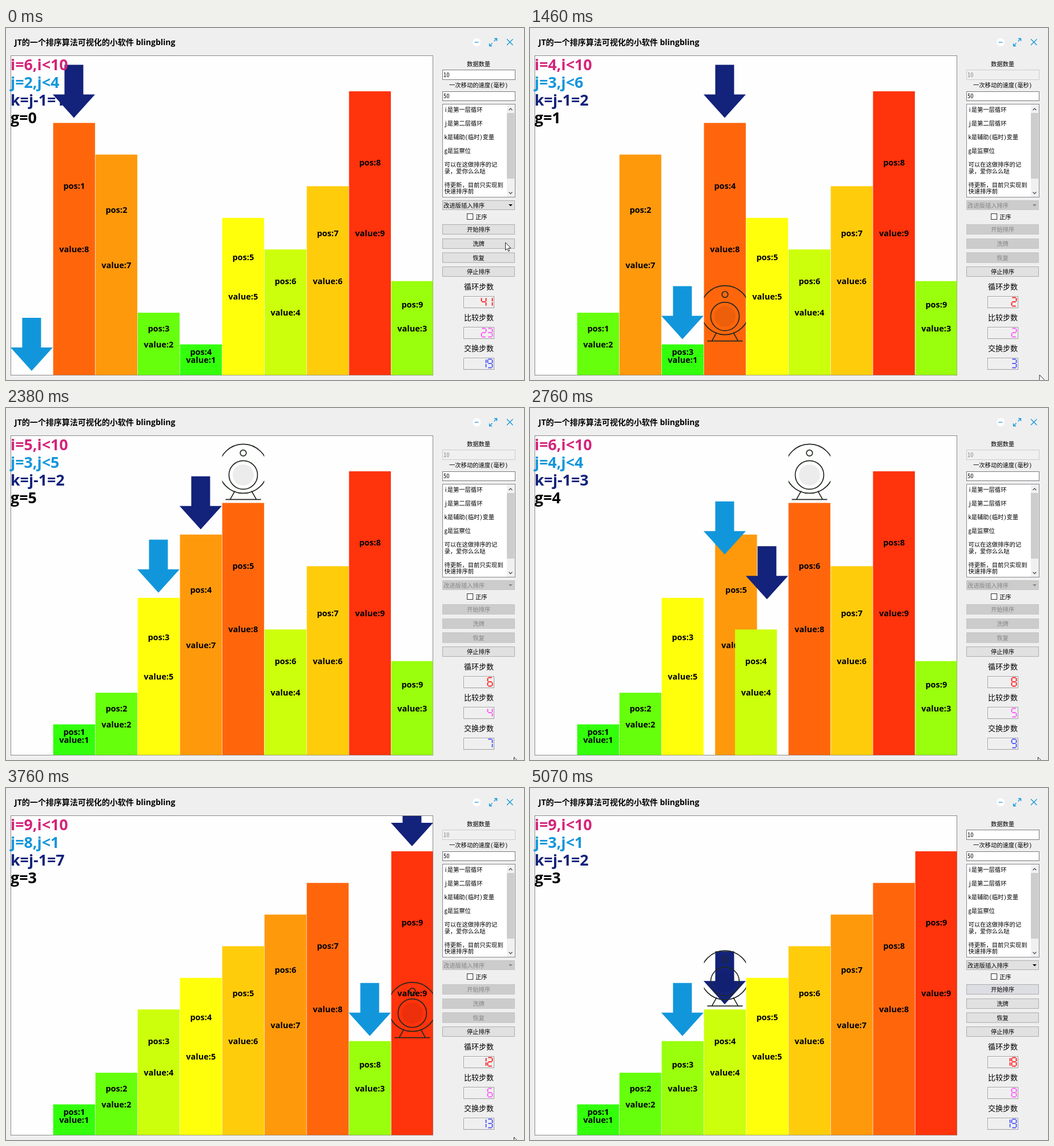
Write an HTML page with a canvas that moves like this. It is 907 px wide and 617 px high and loops after 5530 ms.

```html
<!DOCTYPE html>
<html lang="zh">
<head>
<meta charset="utf-8">
<title>排序可视化</title>
<style>
  html, body { margin: 0; width: 100%; height: 100%; overflow: hidden; background: #efefef; }
  canvas { display: block; }
</style>
</head>
<body>
<canvas id="stage" width="907" height="617"></canvas>
<script>
const ctx = document.getElementById('stage').getContext('2d');
const LOOP = 5530, TICK = 76.9;            // loop length and screen refresh, in ms
const START = 4, DONE = 64, RELEASE = 66;  // in ticks
const BLUE = '#1296db', NAVY = '#13227a', PINK = '#d4237a';
const LATIN = '"Open Sans", "Noto Sans CJK SC", sans-serif';
const SMALL = '10.3px "Noto Sans Mono CJK SC", "Noto Sans CJK SC", sans-serif';

const mix = (a, b, p) => a + (b - a) * p;
const mixPair = (a, b, p) => [mix(a[0], b[0], p), mix(a[1], b[1], p)];
const slotLeft = slot => 8.6 + 74 * slot;
const barTop = value => 610 - 55.45 * value;

// ---- sorting timeline: arrows fly in, bars swap, marker follows ----
const shuffled = [0, 8, 7, 2, 1, 5, 4, 6, 9, 3];

function buildTimeline() {
  const steps = [], order = [...shuffled];
  let clock = START, swaps = 0;
  const add = (duration, run) => {
    steps.push({ start: clock, duration, run });
    clock += duration;
  };
  add(2.63, s => { s.counters = [0, 0, 0]; });
  for (let i = 2; i < 10; i++) {
    const key = order[i];
    if (order[i - 1] < key) continue;
    add(0.837, (s, p) => {
      Object.assign(s, { i, j: i, g: key });
      s.marker = mixPair(s.marker || [i, key], [i, key], p);
    });
    for (let j = i; order[j - 1] > key; j--) {
      const big = order[j - 1];
      add(0.7, (s, p) => {
        s.j = j - 1;
        s.light = mixPair(s.light, [j - 1, big], p);
        s.dark = mixPair(s.dark, [j, key], p);
      });
      add(0.7, (s, p) => {
        s.slot[big] = mix(j - 1, j, p);
        s.slot[key] = mix(j, j - 1, p);
        s.label[big] = j;
        s.label[key] = j - 1;
        s.light = [j - 1, mix(big, key, p)];
        s.dark = [j, mix(key, big, p)];
      });
      clock += 0.75;
      const counters = [swaps, i - 1, ++swaps];
      add(0.55, (s, p) => {
        s.counters = counters;
        s.marker = mixPair(s.marker, [j, big], p);
      });
      [order[j - 1], order[j]] = [key, big];
    }
  }
  return steps;
}
const timeline = buildTimeline();

function stateAt(tick) {
  const slot = [];
  shuffled.forEach((value, index) => { slot[value] = index; });
  const state = {
    i: 6, j: 2, g: 0, slot, label: [...slot],
    light: [0, 0], dark: [1, 8], marker: null, counters: [41, 23, 19]
  };
  for (const { start, duration, run } of timeline)
    if (tick >= start) run(state, Math.min(1, (tick - start) / duration));
  return state;
}

// ---- drawing helpers ----
function text(str, x, y, font, color = '#000', align = 'center') {
  ctx.font = font;
  ctx.fillStyle = color;
  ctx.textAlign = align;
  ctx.fillText(str, x, y);
}
function box(x, y, w, h, fill, border) {
  ctx.fillStyle = fill;
  ctx.fillRect(x, y, w, h);
  ctx.strokeStyle = border;
  ctx.lineWidth = 1;
  ctx.strokeRect(x + 0.5, y + 0.5, w - 1, h - 1);
}
function fillShape(d, color) {
  ctx.fillStyle = color;
  ctx.fill(new Path2D(d));
}
function strokeShape(d, color, width) {
  ctx.strokeStyle = color;
  ctx.lineWidth = width;
  ctx.stroke(new Path2D(d));
}
function at(x, y, draw) {
  ctx.save();
  ctx.translate(x, y);
  draw();
  ctx.restore();
}
function circle(x, y, r) {
  ctx.beginPath();
  ctx.arc(x, y, r, 0, 7);
}

function drawBar(value, slot, label) {
  const top = barTop(value), height = 610 - top, x = slotLeft(slot);
  const red = Math.min(255, 51 * value), green = Math.min(255, 51 * (10 - value));
  ctx.fillStyle = `rgb(${red},${green},12)`;
  ctx.fillRect(x, top, 73.3, 608.5 - top);
  const font = 'bold 14.5px ' + LATIN;
  text('pos:' + label, x + 36.7, top + height / 4 + 5, font);
  text('value:' + value, x + 36.7, top + height / 2 + 5, font);
}

function drawArrow([slot, value], color) {
  at(slotLeft(slot) + 36.3, barTop(value) - 9, () =>
    fillShape('M-16.5 -93H16.5V-41H37L0 0L-37 -41H-16.5Z', color));
}

function drawMarker([slot, value]) {
  at(slotLeft(slot) + 36.8, barTop(value), () => {
    ctx.beginPath();
    ctx.rect(-36.8, -106, 73.6, 104);
    ctx.clip();
    ctx.strokeStyle = '#20281f';
    ctx.lineWidth = 1.7;
    for (const [y, r] of [[-60, 43], [-49, 25], [-87.5, 5.3]]) {
      circle(0, y, r);
      ctx.stroke();
    }
    circle(0, -49, 18.5);
    ctx.fillStyle = 'rgba(0,0,0,.07)';
    ctx.fill();
    strokeShape('M-31 -6H31M-14.5 -21L-23 -6M14.5 -21L23 -6', '#20281f', 1.7);
  });
}

function drawChart(s) {
  box(8, 48, 740, 561, '#fefefe', '#8a8a8a');
  ctx.save();
  ctx.beginPath();
  ctx.rect(8, 49, 739.5, 559.5);
  ctx.clip();
  for (let value = 1; value < 10; value++)
    if (value !== s.g) drawBar(value, s.slot[value], s.label[value]);
  if (s.g) drawBar(s.g, s.slot[s.g], s.label[s.g]);
  drawArrow(s.light, BLUE);
  drawArrow(s.dark, NAVY);
  if (s.marker) drawMarker(s.marker);
  ctx.restore();
  const lines = [
    [`i=${s.i},i<10`, PINK], [`j=${s.j},j<${10 - s.i}`, BLUE],
    [`k=j-1=${s.j - 1}`, NAVY], [`g=${s.g}`, '#000']
  ];
  lines.forEach(([str, color], row) =>
    text(str, 8, 73.8 + 31 * row, 'bold 26.8px ' + LATIN, color, 'left'));
}

function drawTitleBar() {
  text('JT的一个排序算法可视化的小软件 blingbling', 15, 30, 'bold 14px ' + LATIN, '#000', 'left');
  circle(824, 25, 7);
  ctx.fillStyle = '#fff';
  ctx.fill();
  strokeShape('M820.5 25H827.5', BLUE, 1.2);
  strokeShape('M854.5 23.5L859.5 18.5M855 18.5H859.5V23M851.5 26.5L846.5 31.5M846.5 27V31.5H851', BLUE, 1.3);
  strokeShape('M877 19.5L887.5 30M887.5 19.5L877 30', BLUE, 1.3);
}

const segments = {
  a: 'M.8 0H7.2', b: 'M8 .8V6.6', c: 'M8 8.4V14.2', d: 'M.8 15H7.2',
  e: 'M0 8.4V14.2', f: 'M0 .8V6.6', g: 'M.8 7.5H7.2'
};
const digitSegments = ['abcdef', 'bc', 'abdeg', 'abcdg', 'bcfg', 'acdfg', 'acdefg', 'abc', 'abcdefg', 'abcdfg'];

function drawCounter(name, number, y, color) {
  text(name, 828, y - 12, '13px "Noto Sans CJK SC", sans-serif');
  box(801, y, 54, 21, '#efefef', '#a0a0a0');
  strokeShape(`M802.5 ${y + 19}V${y + 1.5}H853`, '#fff', 1);
  [...String(number)].reverse().forEach((digit, place) =>
    at(843.5 - 11 * place, y + 2.5, () => {
      for (const name of digitSegments[digit]) strokeShape(segments[name], color, 1.7);
    }));
}

function drawButton(label, y, enabled, tint = '#e1e1e1') {
  box(764, y, 127, 18, enabled ? tint : '#ccc', enabled ? '#adadad' : '#c4c4c4');
  text(label, 827.5, y + 13, SMALL, enabled ? '#000' : '#858585');
}

function drawPanel(s, tick) {
  const idle = tick < START || tick >= DONE;
  const ink = idle ? '#000' : '#858585';

  text('数据数量', 827.5, 67, SMALL);
  box(764, 73, 128, 18, idle ? '#fff' : '#f0f0f0', idle ? '#7a7a7a' : '#ccc');
  text('10', 766, 86, SMALL, ink, 'left');
  text('一次移动的速度(毫秒)', 827.5, 104, SMALL);
  box(764, 111, 128, 17, '#fff', '#7a7a7a');
  text('50', 766, 123, SMALL, '#000', 'left');

  box(764, 133, 128, 164, '#fff', '#828790');
  const notes = [
    ['i是第一层循环', 143], ['j是第二层循环', 167], ['k是辅助(临时)变量', 191], ['g是监察位', 215],
    ['可以在这做排序的记', 239], ['录，爱你么么哒', 250.5], ['待更新，目前只实现到', 274.5], ['快速排序前', 286]
  ];
  for (const [line, y] of notes) text(line, 767.5, y + 4, SMALL, '#000', 'left');
  ctx.fillStyle = '#f0f0f0';
  ctx.fillRect(877, 134, 14, 162);
  ctx.fillStyle = '#cdcdcd';
  ctx.fillRect(877, 149, 13, 115);
  strokeShape('M880.5 144L883.5 141L886.5 144M880.5 287.5L883.5 290.5L886.5 287.5', '#505050', 1.3);

  box(764, 302, 127, 17, idle ? '#e1e1e1' : '#ccc', idle ? '#adadad' : '#c4c4c4');
  text('改进版插入排序', 766, 314.5, SMALL, ink, 'left');
  fillShape('M880 309H887L883.5 312.5Z', ink);

  box(807, 325, 11, 11, '#fff', '#333');
  text('正序', 822, 335, SMALL, '#000', 'left');

  drawButton('开始排序', 344, idle, tick >= RELEASE ? '#dddde4' : '#e1e1e1');
  drawButton('洗牌', 369, idle);
  drawButton('恢复', 393.5, idle);
  drawButton('停止排序', 418, true);

  drawCounter('循环步数', s.counters[0], 470, '#ff0a0a');
  drawCounter('比较步数', s.counters[1], 524, '#ff46ff');
  drawCounter('交换步数', s.counters[2], 578, '#3c46ff');
}

// Pointer path: tick, x, y
const pointerPath = [
  [0, 874, 376], [1, 863, 334], [4, 863, 334], [13, 887, 551], [17, 897, 600],
  [20, 889, 612], [51, 889, 612], [52, 887, 616], [60, 887, 616], [61, 887, 640], [99, 887, 640]
];
function drawPointer(tick) {
  const next = pointerPath.findIndex(point => point[0] > tick);
  const [t0, x0, y0] = pointerPath[next - 1], [t1, x1, y1] = pointerPath[next];
  const p = (tick - t0) / (t1 - t0);
  at(mix(x0, x1, p) + 0.5, mix(y0, y1, p), () => {
    const outline = 'M0 0V13.5L3.1 10.7L5.2 15.5L7.2 14.6L5.2 9.9H9.5Z';
    fillShape(outline, '#fff');
    strokeShape(outline, '#111', 0.9);
  });
}

function frame() {
  // Ticks begin on whole hundredths of a second
  const hundredths = Math.floor(performance.now() % LOOP / 10);
  const tick = Math.ceil((hundredths + 1) / (TICK / 10)) - 1;
  const state = stateAt(tick);
  ctx.fillStyle = '#efefef';
  ctx.fillRect(0, 0, 907, 617);
  drawTitleBar();
  drawChart(state);
  drawPanel(state, tick);
  drawPointer(tick);
  requestAnimationFrame(frame);
}
frame();
</script>
</body>
</html>
```
